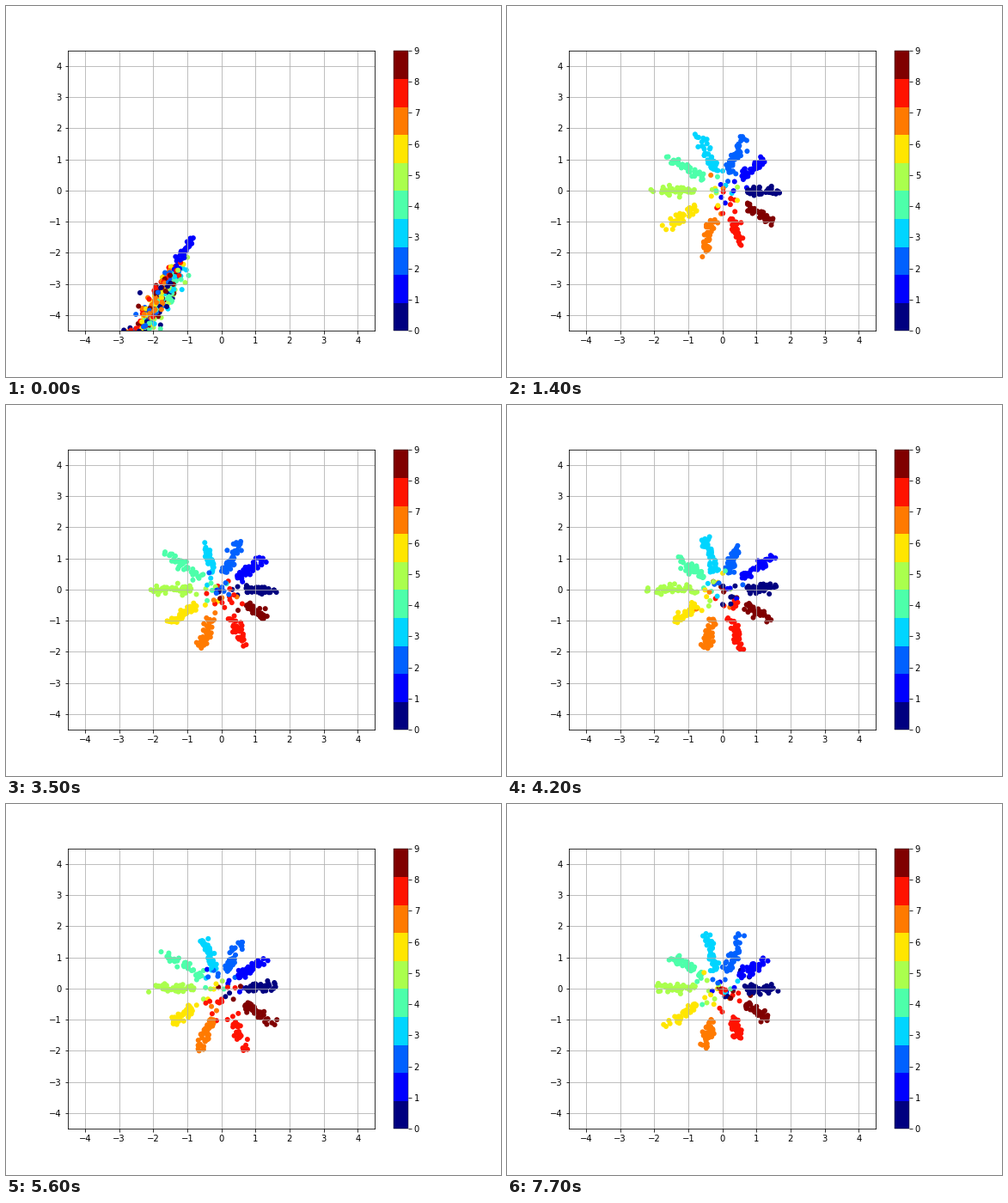
Recreate the animation shown at these times as a matplotlib script. Size 576 px wide and 432 px high, loop 8 s.

```python
import numpy as np
import matplotlib.pyplot as plt
from matplotlib.animation import FuncAnimation
from matplotlib.colors import ListedColormap
from matplotlib.transforms import ScaledTranslation

LOOP, STEP, HOLD = 8000, 100, 700   # ms
CLASSES, PER_CLASS, LIMIT = 10, 45, 4.5
STATES = -(-LOOP // HOLD)


def streak(rng, k, n):
    """Untrained cloud: a diagonal band running off the lower edge."""
    if k == 1:
        y = rng.uniform(-2.6, -1.5, n)
    else:
        y = -2.1 - 3.4 * rng.beta(1.7, 1.4, n)
    side = .12 if k in (3, 4, 5) else -.04
    width = np.clip((-1.2 - y) / 1.8, .3, 1.1)
    x = -1.62 + .5 * (y + 3.1) + width * (side + rng.normal(0, .15, n))
    return np.column_stack([x, y])


def polar(r, theta):
    return r * np.array([np.cos(theta), np.sin(theta)])


def petal(rng, k, n):
    """Trained cluster: one arm of the star plus a few strays near the centre."""
    theta = 2 * np.pi * k / CLASSES
    root = polar(.75 + .2 * np.cos(theta - np.radians(260)), theta)
    reach = 1.9 + .2 * np.cos(theta - np.radians(216)) + rng.normal(0, .15)
    axis = polar(reach, theta + rng.normal(.01, .04)) - root
    normal = np.array([-axis[1], axis[0]]) / np.hypot(*axis)

    t = rng.beta(1.2, 1.5, (n, 1))
    arm = root + t * axis + rng.normal(0, .07, (n, 1)) * normal
    inner = .4 * root + rng.normal(0, .28, (n, 2))
    stray = rng.random((n, 1)) < (.2 if k == 8 else .08)
    return np.where(stray, inner, arm)


def make_state(i):
    rng = np.random.default_rng(40 + i)
    cloud = petal if i else streak
    points = np.concatenate([cloud(rng, k, PER_CLASS) for k in range(CLASSES)])
    labels = np.repeat(np.arange(CLASSES), PER_CLASS)
    order = rng.permutation(len(labels))
    return points[order], labels[order]


states = [make_state(i) for i in range(STATES)]

plt.rcParams.update({"font.family": "DejaVu Sans", "font.size": 10,
                     "figure.subplot.bottom": .125})
fig, ax = plt.subplots(figsize=(8, 6), dpi=72)
cmap = ListedColormap(plt.colormaps["jet"](np.linspace(0, 1, CLASSES)))
points, labels = states[0]
dots = ax.scatter(*points.T, c=labels, cmap=cmap, vmin=0, vmax=CLASSES - 1,
                  marker="o", edgecolor="none")
ax.set(xlim=(-LIMIT, LIMIT), ylim=(-LIMIT, LIMIT),
       xticks=range(-4, 5), yticks=range(-4, 5))
ax.grid(True)

bar = fig.colorbar(dots, ax=ax, ticks=range(CLASSES))
bar.outline.set_linewidth(.4)
# Round the colour boundaries down to whole pixels
half_px = ScaledTranslation(0, -.49 / 72, fig.dpi_scale_trans)
bar.solids.set_transform(bar.solids.get_transform() + half_px)


def update(frame):
    pts, lab = states[frame * STEP // HOLD]
    dots.set_offsets(pts)
    dots.set_array(lab)
    return dots,


anim = FuncAnimation(fig, update, frames=LOOP // STEP, interval=STEP,
                     repeat=True, repeat_delay=0)
plt.show()
```
